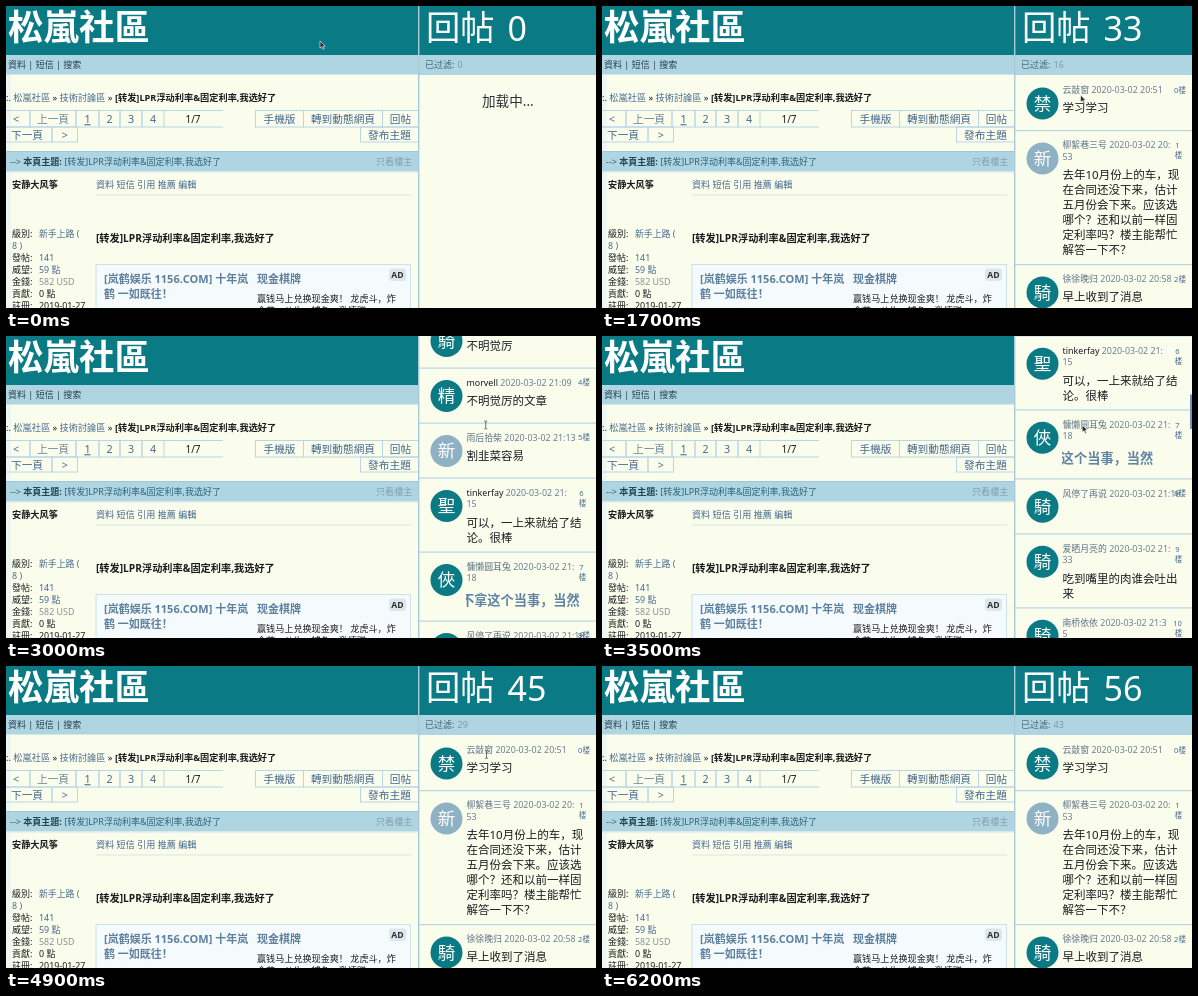
Recreate the animation shown at these times as an HTML page. Size 590 px wide and 302 px high, loop 6300 ms.

```html
<!DOCTYPE html>
<html lang="zh-Hans">
<head>
<meta charset="utf-8">
<style>
html, body { margin: 0; width: 100%; height: 100%; overflow: hidden; background: #fafcec; }
svg { display: block; }
text { font-family: "Noto Sans", "Noto Sans CJK SC", "Noto Sans CJK JP", sans-serif; white-space: pre; }
</style>
</head>
<body>
<svg id="stage" width="590" height="302" viewBox="0 0 590 302">
  <defs>
    <clipPath id="leftClip"><rect width="412" height="302"/></clipPath>
    <clipPath id="rollClip"><rect x="460" y="0" width="115" height="2000"/></clipPath>
  </defs>
  <rect width="590" height="302" fill="#fafcec"/>
  <g clip-path="url(#leftClip)"><g id="page"></g></g>
  <g id="panel"></g>
  <rect x="412" width="1.4" height="302" fill="#a9cbd9"/>
  <rect id="thumb" x="588" width="2" rx="1" fill="#6f93b4"/>
  <path id="arrow" d="M0 0V7.2L1.8 5.7L3 8.4L4.2 7.9L3 5.3H5.2Z" fill="#1c2a30" stroke="#fff" stroke-width=".6"/>
  <path id="beam" d="M-1.5 -4Q0 -4 0 -3Q0 -4 1.5 -4M0 -3V3M-1.5 4Q0 4 0 3Q0 4 1.5 4" fill="none" stroke="#455" stroke-width=".8"/>
</svg>
<script>
const $ = id => document.getElementById(id);
const TEAL = '#0a7a84', BAR = '#b0d5e2', PALE = '#8fb1c4', INK = '#1a1d20';
const BLUE = '#456a8e', GRAY = '#6b7f90', LINE = '#b9d6e5';

function add(parent, tag, attrs) {
  const el = document.createElementNS('http://www.w3.org/2000/svg', tag);
  for (const k in attrs) el.setAttribute(k, attrs[k]);
  parent.append(el);
  return el;
}
const box = (g, x, y, w, h, fill, more) => add(g, 'rect', { x, y, width: w, height: h, fill, ...more });

// y is the vertical middle of the line
function write(g, x, y, size, fill, str, more) {
  const el = add(g, 'text', { x, y: y + size * .37, 'font-size': size, fill, ...more });
  el.textContent = str;
  return el;
}
function span(el, fill, str, more) {
  add(el, 'tspan', { fill, ...more }).textContent = str;
}
const bold = { 'font-weight': 700 };
const mid = { 'text-anchor': 'middle' };

function buildPage(g) {
  const topic = '[转发]LPR浮动利率&固定利率,我选好了';
  box(g, 0, 0, 412, 49, TEAL);
  write(g, 2, 21, 35.5, '#fff', '松嵐社區', bold);
  box(g, 0, 49, 412, 19.5, BAR);
  write(g, 2, 59, 9, '#24404e', '資料 | 短信 | 搜索');
  box(g, 0, 69, 5, 460, '#eff6f1');

  const path = write(g, 0, 92, 9.2, INK, ':. ');
  span(path, BLUE, '松嵐社區');
  span(path, INK, ' » ');
  span(path, BLUE, '技術討論區');
  span(path, INK, ' » ');
  span(path, INK, topic, bold);

  const cell = (x, y, w, h, str) => {
    box(g, x, y, w, h, 'none', { stroke: LINE });
    return write(g, x + w / 2, y + h / 2 + .5, 10.7, BLUE, str, mid);
  };
  cell(-4, 104.5, 28, 16.5, '<');
  cell(24, 104.5, 46, 16.5, '上一頁').setAttribute('fill', '#6f8798');
  [70, 93, 114, 136].forEach((x, i) => {
    const c = cell(x, 104.5, [23, 21, 22, 22][i], 16.5, i + 1);
    if (!i) c.setAttribute('text-decoration', 'underline');
  });
  box(g, 158, 104, 59, 1, LINE);
  box(g, 158, 120.5, 59, 1, LINE);
  write(g, 187, 113.5, 10, INK, '1/7', mid);
  cell(249.5, 104.5, 48, 16.5, '手機版');
  cell(297.5, 104.5, 79, 16.5, '轉到動態網頁');
  cell(376.5, 104.5, 36, 16.5, '回帖');
  cell(-4, 121, 50, 15, '下一頁');
  cell(46, 121, 25.5, 15, '>');
  cell(354.5, 121, 58, 15, '發布主題');

  box(g, 0, 145, 412, 20, BAR);
  box(g, 0, 145, 412, 1, '#9cc8d8');
  box(g, 0, 165, 412, 1.5, '#d5e9ee');
  const head = write(g, 4, 156, 9, '#28606f', '--> ');
  span(head, '#1f4653', '本頁主題: ', bold);
  span(head, '#2c6478', topic);
  write(g, 370, 156, 9.1, '#7f9fae', '只看樓主');

  write(g, 6, 178.5, 9.2, INK, '安静大风筝', bold);
  write(g, 90, 178.5, 9.1, BLUE, '資料 短信 引用 推薦 編輯');
  box(g, 90, 188.5, 315, 1, '#dde8e4');

  [['級別:', '新手上路 ('], ['', ''], ['發帖:', '141'], ['威望:', '59 點'],
   ['金錢:', '582 USD'], ['貢獻:', '0 點'], ['註冊:', '2019-01-27']].forEach(([k, v], i) => {
    const y = 227.8 + i * 11.95;
    write(g, 6, y, 9, INK, k, { 'font-weight': 500 });
    write(g, 33, y, 8.9, i == 4 ? '#8a8f93' : i > 4 ? INK : BLUE, v);
  });
  write(g, 6, 239.8, 8.9, BLUE, '8 )');

  write(g, 90, 232.5, 10.2, INK, topic, bold);
  box(g, 90, 258.5, 314.5, 123, '#f5fafc', { stroke: '#cbe1ec' });
  box(g, 383, 262.5, 17, 12.5, '#dde7ea', { rx: 3 });
  write(g, 391.5, 269, 8.6, '#263238', 'AD', { ...bold, ...mid });
  const ad = (x, y, str) => write(g, x, y, 11, '#5d809f', str, bold);
  ad(98, 273, '[岚鹤娱乐 1156.COM] 十年岚');
  ad(98, 288, '鹤 一如既往！');
  ad(251, 273, '现金棋牌');
  ['老品牌,值得信赖! 1元即可存取款,', '美女荷官在线发牌，百家乐，牛牛，', 'AV捕鱼王，上万款老虎机游戏任你',
   '玩。下载APP送18元，赢到100可以', '直接提现。', 'FHYL.COM'].forEach((s, i) =>
    write(g, 98, 306.5 + i * 12.5, 9.1, i == 5 ? '#4d5a64' : INK, s));
  ['赢钱马上兑换现金爽！ 龙虎斗，炸', '金花，斗牛，捕鱼，激情赚', '钱！！！注册即送8元现金！注册网',
   '址：', '9915.com'].forEach((s, i) =>
    write(g, 251, 292.5 + i * 12.4, 9.1, i == 4 ? '#3f5a70' : INK, s));

  write(g, 90, 405, 10.5, INK, '先说结论');
  write(g, 90, 428, 10.6, INK, '1.房贷剩余5年内  选固定利率    原因:别费那个心力了');
  write(g, 90, 452, 10.6, INK, '2.房贷剩余6-10年  贷款利率7.0左右  选LPR  原因:五年内LPR是下');
}

// badge, user, time (wrapped at |), lines of the reply
const replies = [
  ['禁', '云敲窗', '2020-03-02 20:51', '学习学习'],
  ['新', '柳絮巷三号', '2020-03-02 20:|53', '去年10月份上的车，现', '在合同还没下来，估计', '五月份会下来。应该选',
    '哪个？还和以前一样固', '定利率吗？楼主能帮忙', '解答一下不？'],
  ['騎', '徐徐晚归', '2020-03-02 20:58', '早上收到了消息'],
  ['騎', '檐角铃', '2020-03-02 21:02', '不明觉厉'],
  ['精', 'morvell', '2020-03-02 21:09', '不明觉厉的文章'],
  ['新', '雨后拾柴', '2020-03-02 21:13', '割韭菜容易'],
  ['聖', 'tinkerfay', '2020-03-02 21:|15', '可以，一上来就给了结', '论。很棒'],
  ['俠', '慵懒圆耳兔', '2020-03-02 21:|18', '~不拿这个当事，当然'],
  ['騎', '风停了再说', '2020-03-02 21:18', ''],
  ['騎', '爱晒月亮的', '2020-03-02 21:|33', '吃到嘴里的肉谁会吐出', '来'],
  ['騎', '南桥依依', '2020-03-02 21:3|5', '越了解，越心烦。到底', '选哪个？'],
  ['新', '数着星光的他', '2020-03-02|21:36', '一语点醒梦中人'],
  ['騎', '巴尔诺维奇', '2020-03-02 2|1:52', '感谢分享 我选择以不变', '应万变'],
  ['新', '苔痕', '2020-03-02 22:05', '']
];

let roll;
function buildReplies(g) {
  let top = 69.5;
  replies.forEach(([badge, user, time, ...lines], n) => {
    const [a, b] = time.split('|');
    const moving = lines[0][0] == '~';
    add(g, 'circle', { cx: 440.5, cy: top + 28, r: 16, fill: badge == '新' ? PALE : TEAL });
    write(g, 440.5, top + 28, 17.5, '#fff', badge, { ...mid, 'font-weight': 300 });
    const name = write(g, 460.5, top + 14.5, 8.9, /^\w/.test(user) ? INK : '#5d7286', user + ' ');
    span(name, GRAY, a);
    if (b) {
      write(g, 460.5, top + 26, 8.9, GRAY, b);
      write(g, 575.5, top + 15, 7.5, BLUE, n, mid);
      write(g, 576.5, top + 25, 7.5, BLUE, '楼', mid);
    } else write(g, 578, top + 14.5, 7.5, BLUE, n + '楼', mid);
    if (moving) {
      const clip = add(g, 'g', { 'clip-path': 'url(#rollClip)' });
      roll = write(clip, 0, top + 48, 13.2, '#5f84a4', lines[0].slice(1), bold);
    } else lines.forEach((s, i) => write(g, 460.5, top + (b ? 44.5 : 32.5) + i * 15, 11.5, INK, s));
    top += moving ? 69 : b ? 44 + 15 * lines.length : 55;
    box(g, 413, top - .5, 177, 1.2, LINE);
  });
}

buildPage($('page'));
const panel = $('panel');
box(panel, 412, 0, 178, 49, TEAL);
write(panel, 420, 21, 34.3, '#fff', '回帖', { 'font-weight': 100 });
const count = write(panel, 501.5, 22, 34, '#fff', '0');
box(panel, 412, 49, 178, 20, BAR);
write(panel, 419, 59, 9, '#3f6474', '已过滤:');
const skipped = write(panel, 451.5, 59, 9, '#7d99a8', '0');
const loading = write(panel, 476, 95, 13.6, '#2b3033', '加载中...');
const list = add(panel, 'g', {});
buildReplies(list);

// [time, value...] steps, eased between
function ease(keys, t) {
  let i = 0;
  while (i < keys.length - 2 && t >= keys[i + 1][0]) i++;
  const [t0, ...a] = keys[i], [t1, ...b] = keys[i + 1];
  const p = Math.min(1, Math.max(0, (t - t0) / (t1 - t0)));
  const k = p * p * (3 - 2 * p);
  return a.map((v, j) => v + (b[j] - v) * k);
}
const last = (keys, t) => keys.filter(k => k[0] <= t).pop();

const panelScroll = [[2100, 0], [2900, 336.5], [3100, 336.5], [4000, 677.5], [4200, 677.5], [4800, 0]];
const pageScroll = [[5050, 0], [5450, 163], [5700, 163], [6100, 0]];
const pointer = [[600, 314, 35], [1500, 478.5, 89], [4100, 480.5, 89], [4900, 480.5, 88.5], [5100, 297.5, 142], [6300, 297.5, 142]];
const shape = [[0, 'arrow'], [2900, 'beam'], [3400, 'arrow'], [4800, 'beam'], [5000, 'arrow'], [6100, '']];
const counts = [[0, 0, 0], [800, 17, 7], [1400, 33, 16], [3900, 45, 29], [5300, 56, 43]];
const show = (el, on) => el.setAttribute('visibility', on ? 'visible' : 'hidden');
const move = (el, x, y) => el.setAttribute('transform', `translate(${x} ${y})`);

function draw(t) {
  const [down] = ease(panelScroll, t);
  move(panel, 0, -down);
  move($('page'), 0, -ease(pageScroll, t)[0]);
  const [, shown, hid] = last(counts, t);
  count.textContent = shown;
  skipped.textContent = hid;
  show(loading, !shown);
  show(list, shown);
  roll.setAttribute('x', 455 - (t - 3000) * .045);
  $('thumb').setAttribute('y', down * .1215);
  $('thumb').setAttribute('height', 35);
  show($('thumb'), t > 3100 && t < 4800);
  const [x, y] = ease(pointer, t), kind = last(shape, t)[1];
  for (const id of ['arrow', 'beam']) {
    move($(id), x, y);
    show($(id), kind == id);
  }
}

const start = performance.now();
function tick(now) {
  draw(Math.floor(Math.max(0, now - start) % 6300 / 100) * 100);
  requestAnimationFrame(tick);
}
draw(0);
requestAnimationFrame(tick);
</script>
</body>
</html>
```
